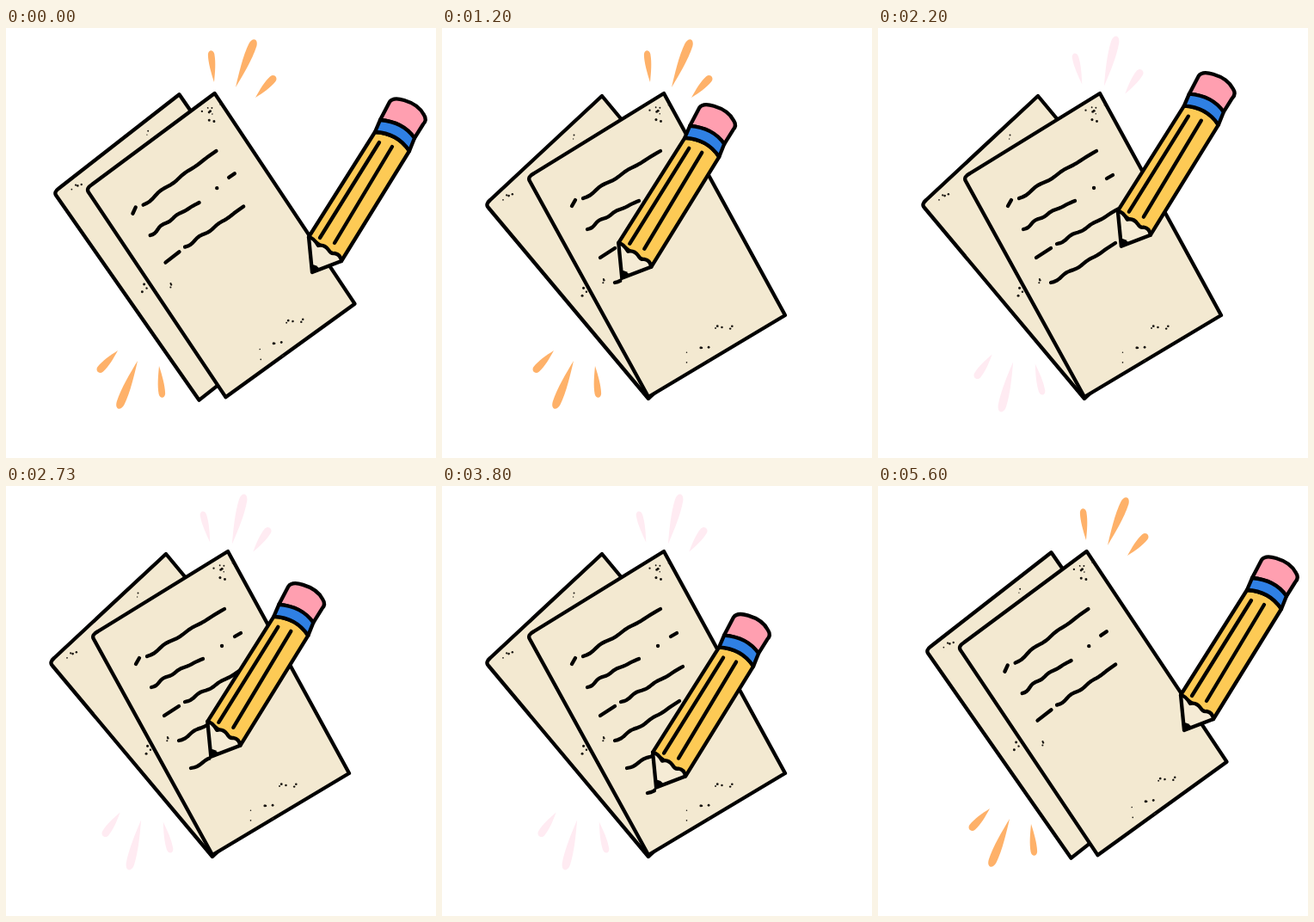
Write an HTML page that moves like this. It is 500x500 px and loops after 5730 ms.

```html
<!DOCTYPE html>
<html lang="en">
<head>
<meta charset="utf-8">
<title>Writing pencil</title>
<style>
  html, body { margin: 0; width: 100%; height: 100%; overflow: hidden; background: #fff; }
  svg { display: block; width: 100vw; height: 100vh; }
  .outline { stroke: #000; stroke-width: 4.3; stroke-linecap: round; stroke-linejoin: round; }
  .paper { fill: #f3e9d1; }
  .line { fill: none; }
</style>
</head>
<body>
<svg viewBox="0 0 500 500">
  <defs>
    <clipPath id="clip0"><rect height="500"/></clipPath>
    <clipPath id="clip1"><rect height="500"/></clipPath>
    <clipPath id="clip2"><rect height="500"/></clipPath>
    <g id="fan"></g>
  </defs>
  <g id="rays">
    <use href="#fan"/>
    <use href="#fan" transform="rotate(180 210 228)"/>
  </g>

  <g id="back">
    <path class="outline paper" d="M56 200 L186 79 L374 305 L240 431 L54 209 Q50 205 56 200Z"/>
  </g>

  <g id="front">
    <path class="outline paper" d="M107 169 L258 76 L399 334 L240 429 L102 178 Q99 173 107 169Z"/>
  </g>

  <g id="pencil" class="outline">
    <path fill="#fdca55" d="M429 121 L352 243 L390 271 L469 143 Q455 122 429 121Z"/>
    <path fill="#f5ebd5" d="M352 243 Q358 244 363 253 Q370 251 375 258 Q378 263 382 262 Q389 263 390 271 L356 284Z"/>
    <path stroke="none" d="M355 275 Q362 275 365 281 L356 284Z"/>
    <path fill="#ff9fb0" d="M435 107 L446 86 Q450 80 463 84 Q480 89 486 101 Q490 107 485 112 L475 128 Q460 109 435 107Z"/>
    <path fill="#2f80e4" d="M435 107 Q462 109 475 128 L469 143 Q455 122 429 121Z"/>
    <path class="line" d="M434 133 L365 244 M449 138 L382 250"/>
  </g>
</svg>
<script>
const LOOP = 5730;
const REST = [356, 284];
const $ = id => document.getElementById(id);
const add = (id, markup) => $(id).insertAdjacentHTML('beforeend', markup);

let seed = 7;
const random = () => (seed = seed * 16807 % 2147483647) / 2147483647;

// Cluster of small dots spread around a point
function speckle(id, x, y, spreadX, spreadY, count) {
  for (let i = 0; i < count; i++) {
    const cx = x + (random() * 2 - 1) * spreadX, cy = y + (random() * 2 - 1) * spreadY;
    add(id, `<circle cx="${cx}" cy="${cy}" r="${.6 + random()}" fill="#1a1712"/>`);
  }
}
speckle('back', 81, 188, 10, 14, 4);
speckle('back', 151, 127, 4, 5, 2);
speckle('back', 162, 303, 7, 10, 4);
speckle('front', 253, 102, 13, 14, 9);
speckle('front', 190, 293, 5, 4, 3);
speckle('front', 325, 348, 14, 6, 5);
speckle('front', 298, 379, 16, 10, 6);

// Teardrop from a sharp point to a round end
function ray(x, y, turn, len, width) {
  const h = width / 2;
  add('fan', `<path transform="translate(${x} ${y}) rotate(${turn})" d="M0 0
    C${len * .3} ${-h * .6} ${len * .6} ${-h * 1.2} ${len * .88} ${-h}
    C${len * 1.04} ${-h * .8} ${len * 1.04} ${h * .8} ${len * .88} ${h}
    C${len * .6} ${h * 1.2} ${len * .3} ${h * .6} 0 0Z"/>`);
}
ray(242, 63, -96, 37, 7.5);
ray(267, 69, -68, 60, 9.5);
ray(290, 81, -47, 34, 8.5);

// Hand-drawn line: a slight bow plus a wobble that fades towards the end
function scribble(x1, y1, x2, y2, bow) {
  let d = '';
  for (let i = 0; i <= 24; i++) {
    const u = i / 24;
    const off = bow * Math.sin(Math.PI * u) + 1.5 * (1 - u) * Math.sin(6 * Math.PI * u);
    d += `${i ? 'L' : 'M'}${x1 + (x2 - x1) * u + off * .5} ${y1 + (y2 - y1) * u + off * .85}`;
  }
  return d;
}
const ink = (d, attrs = '') => add('front', `<path class="outline line" d="${d}" ${attrs}/>`);

ink(scribble(164, 198, 254, 143, -.5) + 'M151 207 L155 200');
ink(scribble(169, 234, 229, 201, -2) + 'M251 186 h.1 M266 175 L273 171');
ink(scribble(208, 251, 280, 210, .5) + 'M184 267 L201 256');

// Lines written by the pencil: time span, tip at start and end, shape
const written = [
  { from: 1130, to: 2000, start: [201, 296], end: [302, 232], d: scribble(201, 296, 276, 250, 1) + 'M295 239 L299 236' },
  { from: 2630, to: 3200, start: [219, 326], end: [328, 263], d: scribble(215, 328, 295, 285, 1.5) + 'M318 270 L322 267' },
  { from: 3770, to: 4270, start: [242, 355], end: REST, d: scribble(239, 357, 308, 311, 2.5) + 'M337 299 L339 298' }
];
written.forEach((line, i) => ink(line.d, `id="ink${i}" clip-path="url(#clip${i})"`));

const span = (t, from, to) => Math.min(1, Math.max(0, (t - from) / (to - from)));
const sine = u => (1 - Math.cos(Math.PI * u)) / 2;
const easeOut = u => 1 - (1 - u) ** 2;
const mix = (a, b, u) => a.map((v, i) => v + (b[i] - v) * u);

// Glide to each line's start, then write it at an even pace
function tipAt(t) {
  let tip = REST, since = 130;
  for (const { from, to, start, end } of written) {
    if (t < from) return mix(tip, start, sine(span(t, since, from)));
    if (t < to) return mix(start, end, span(t, from, to));
    tip = end;
    since = to;
  }
  return tip;
}

function draw(t) {
  const open = easeOut(span(t, 200, 1200)) - easeOut(span(t, 4370, 5370));
  const tilt = 5 * (1 - open);
  $('front').setAttribute('transform', `rotate(${-tilt} 249.5 252.5)`);
  $('back').setAttribute('transform', `rotate(${tilt} 213.3 255.3)`);

  const [x, y] = tipAt(t);
  $('pencil').setAttribute('transform', `translate(${x - REST[0]} ${y - REST[1]})`);

  written.forEach(({ from, to }, i) => {
    $('clip' + i).firstElementChild.setAttribute('width', t < from ? 0 : t < to ? x : 500);
    $('ink' + i).setAttribute('opacity', 1 - span(t, 4700, 5300));
  });

  const alternate = t % 400 >= 200;
  $('rays').setAttribute('fill', alternate ? '#ffebf2' : '#feb169');
  $('fan').setAttribute('transform', alternate ? 'translate(-4 -1) rotate(-8 266 70)' : '');
}

const start = performance.now();
function tick() {
  draw((performance.now() - start) % LOOP);
  requestAnimationFrame(tick);
}
draw(0);
requestAnimationFrame(tick);
</script>
</body>
</html>
```
